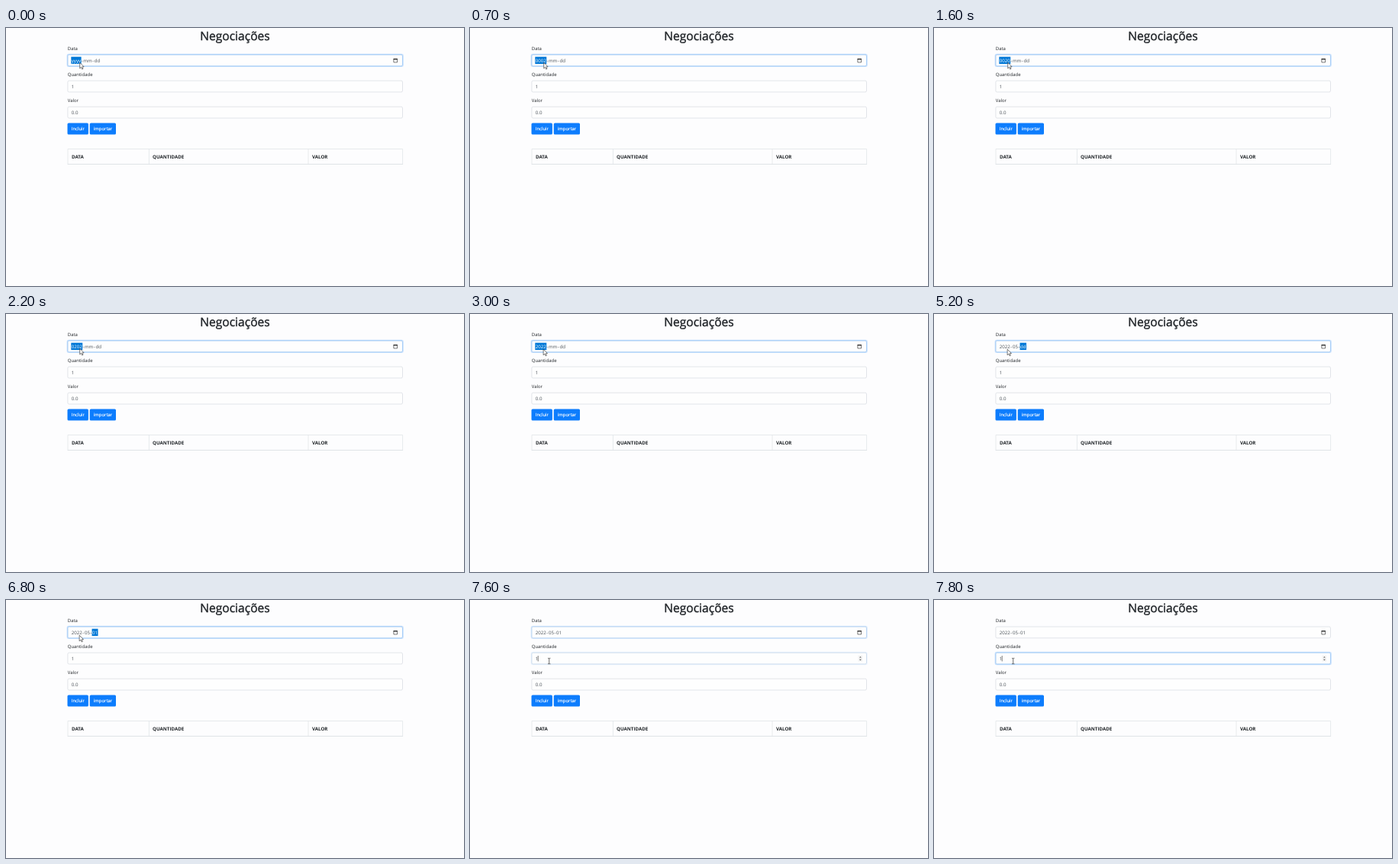
Recreate the animation shown at these times as an HTML page. Size 600 by 338 pixels, loop 8000 ms.

```html
<!DOCTYPE html>
<html lang="pt">
<head>
<meta charset="utf-8">
<title>Negociações</title>
<style>
html, body { margin: 0; width: 100%; height: 100%; overflow: hidden; background: #fdfdfe; }
svg { display: block; width: 600px; height: 338px; }
text { font: 5.95px "Open Sans", "Noto Sans", sans-serif; fill: #212529; text-rendering: geometricPrecision; }
.title { font-size: 15.6px; text-anchor: middle; stroke: #212529; stroke-width: .4; }
.value { font-size: 6.1px; fill: #495057; }
.head { font-size: 6.2px; font-weight: 700; }
.button { fill: #fff; text-anchor: middle; stroke: #fff; stroke-width: .15; }
.box { fill: #fefefe; stroke: #ced4da; stroke-width: .6; }
.ring { fill: none; stroke: #007bff; stroke-opacity: .2; stroke-width: 1.2; }
.edge { fill: none; stroke: #8cc4ff; stroke-width: .6; }
.table { fill: none; stroke: #dee2e6; stroke-width: .7; }
</style>
</head>
<body>
<svg id="stage" viewBox="0 0 600 338">
  <text class="title" x="300" y="15.8">Negociações</text>
  <g id="form"></g>
  <rect x="80.5" y="124.5" width="27.4" height="15" rx="1.6" fill="#0d7dfd"/>
  <text class="button" x="94.4" y="134.2">Incluir</text>
  <rect x="109.7" y="124.5" width="34.3" height="15" rx="1.6" fill="#0d7dfd"/>
  <text class="button" x="127" y="134.2">importar</text>

  <path class="table" d="M81 178.5V158.5H519.6V178.5M187.4 158.5V178.5M396 158.5V178.5"/>
  <path class="table" d="M80.7 178.4H520" style="stroke-width:1"/>
  <text class="head" x="86" y="170.8">DATA</text>
  <text class="head" x="192" y="170.8">QUANTIDADE</text>
  <text class="head" x="401" y="170.8">VALOR</text>

  <rect id="mark" y="37.7" height="9.4" fill="#0078d7"/>
  <g id="date"></g>
  <path d="M507.9 40.6H512.5V45H507.9Z" fill="none" stroke="#222" stroke-width=".6"/>
  <path d="M507.6 40.2H512.8V41.4H507.6Z" fill="#222"/>

  <text class="value" x="85.8" y="78.9">1</text>
  <text class="value" x="85.8" y="112.9">0.0</text>
  <g id="spinner">
    <rect x="508.6" y="72.6" width="5.6" height="8" fill="#f3f3f3"/>
    <path d="M510.1 75.5L511.4 74L512.7 75.5ZM509.9 77.7L511.4 79.2L512.9 77.7Z" fill="#555"/>
  </g>
  <path id="caret" d="M89.2 73V80.4" stroke="#222" stroke-width=".6"/>
  <path id="arrow" d="M0 0V7.6L1.8 6L3 8.7L4.3 8.1L3.1 5.5H5.4Z" fill="#fff" stroke="#222" stroke-width=".6"/>
  <path id="beam" d="M-1.7 -3.7H-.5L0 -3.3L.5 -3.7H1.7M0 -3.3V3.3M-1.7 3.7H-.5L0 3.3L.5 3.7H1.7" fill="none" stroke="#222" stroke-width=".65"/>
</svg>
<script>
const $ = id => document.getElementById(id);

const rect = (cls, x, y, w, h) =>
  `<rect class="${cls}" x="${x}" y="${y}" width="${w}" height="${h}" rx="1.7"/>`;

$('form').innerHTML = ['Data', 'Quantidade', 'Valor'].map((label, i) => {
  const y = 35 + 34.1 * i;
  return `<text x="80.8" y="${y - 5.8}">${label}</text>` +
    rect('box', 80.9, y, 438.6, 14.8) +
    `<g class="focus" opacity="0">${rect('ring', 80.2, y - .7, 440, 16.2)}${rect('edge', 80.9, y, 438.6, 14.8)}</g>`;
}).join('');
const rings = document.querySelectorAll('.focus');

$('date').innerHTML = '<text class="value" y="44.8"></text>'.repeat(5);
const parts = [...$('date').children];

// start time, year, month, day, selected part
const steps = [
  [0, 'yyyy', 'mm', 'dd', 0],
  [300, '0002', 'mm', 'dd', 0],
  [1600, '0020', 'mm', 'dd', 0],
  [2000, '0202', 'mm', 'dd', 0],
  [2500, '2022', 'mm', 'dd', 0],
  [3400, '2022', 'mm', 'dd', 2],
  [3700, '2022', '00', 'dd', 2],
  [4700, '2022', '05', 'dd', 4],
  [6800, '2022', '05', '01', 4],
  [7550, '2022', '05', '01', -1]
];
const click = 7550;

const progress = (t, from, to) => Math.max(0, Math.min(1, (t - from) / (to - from)));
const ease = p => p * p * (3 - 2 * p);
const show = (id, on) => $(id).setAttribute('visibility', on ? 'visible' : 'hidden');

function drawDate(t) {
  const [, year, month, day, selected] = steps.filter(s => s[0] <= t).pop();
  let x = 85.3;
  [year, '-', month, '-', day].forEach((s, i) => {
    const el = parts[i], pad = s === '-' ? .1 : .5;
    el.textContent = s;
    el.setAttribute('x', x + pad);
    const w = el.getComputedTextLength() + 2 * pad;
    el.style.fill = i === selected ? '#fff' : '';
    if (i === selected) {
      $('mark').setAttribute('x', x);
      $('mark').setAttribute('width', w);
    }
    x += w;
  });
  show('mark', selected >= 0);
}

function drawPointer(t) {
  const drift = ease(progress(t, 2500, 2800));
  const move = ease(progress(t, 6950, 7450));
  const x = 96.7 - .6 * drift + 7.6 * move;
  const y = 45.3 + .9 * drift + 33.8 * move;
  const over = y > 69;
  for (const id of ['arrow', 'beam']) $(id).setAttribute('transform', `translate(${x} ${y})`);
  show('arrow', !over);
  show('beam', over);
  show('spinner', over);
}

function draw() {
  const t = performance.now() % 8000;
  const shift = progress(t, click, click + 150);
  rings[0].setAttribute('opacity', 1 - shift);
  rings[1].setAttribute('opacity', shift);
  show('caret', t >= click);
  drawDate(t);
  drawPointer(t);
  requestAnimationFrame(draw);
}
draw();
</script>
</body>
</html>
```
